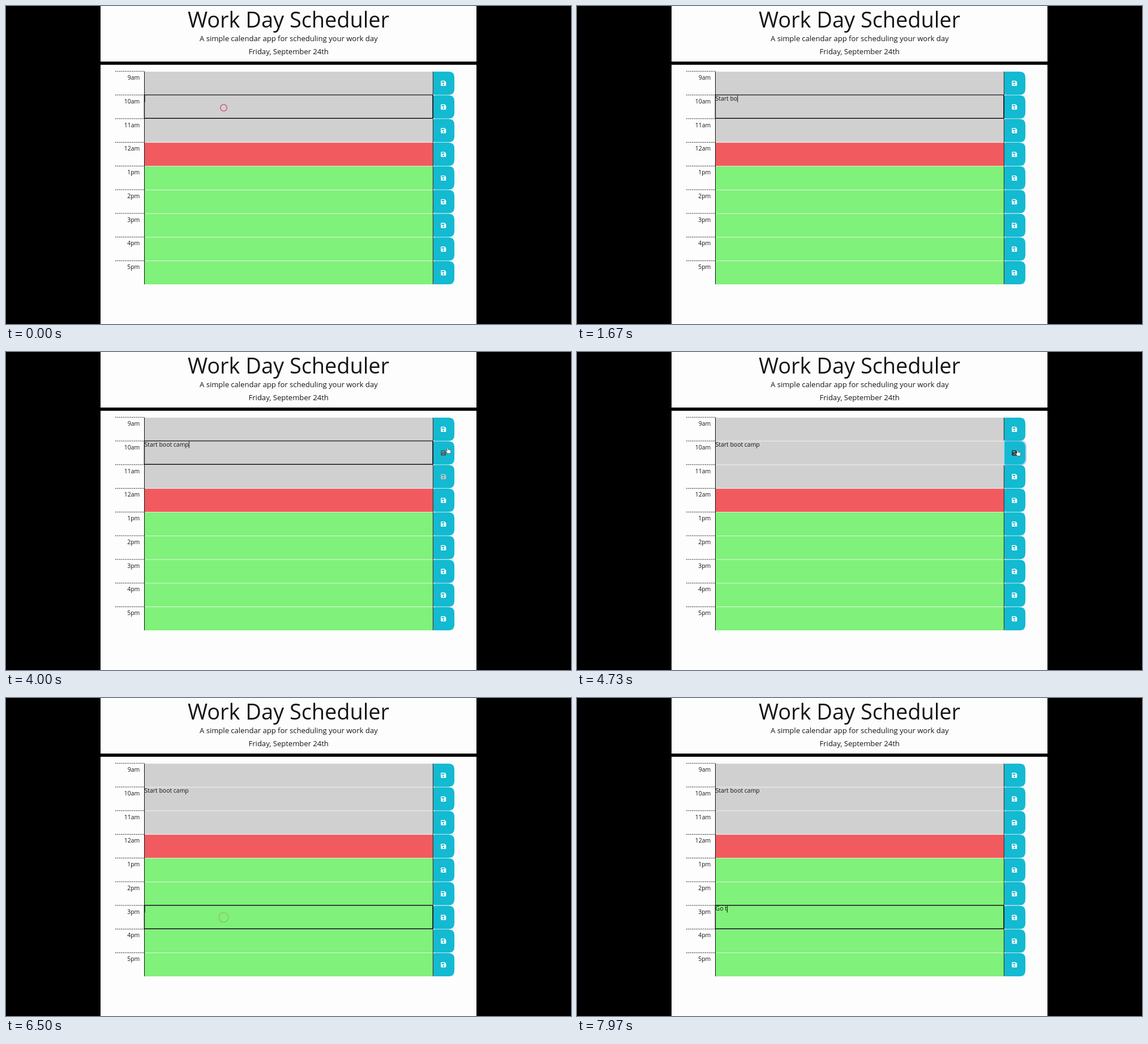
An HTML page that plays this animation: 998 px wide and 561 px high, repeating every 8000 ms.

```html
<!DOCTYPE html>
<html lang="en">
<head>
<meta charset="utf-8">
<title>Work Day Scheduler</title>
<style>
html, body { margin: 0; width: 100%; height: 100%; overflow: hidden; background: #000; }
svg { display: block; width: 998px; height: 561px; }
text { font-family: "Open Sans", sans-serif; fill: #151515; white-space: pre; }
.center { text-anchor: middle; }
.small { font-size: 10.44px; }
</style>
</head>
<body>
<svg id="stage" viewBox="0 0 998 561">
  <rect x="167" width="664" height="561" fill="#fdfdfd"/>
  <rect x="167" y="98" width="664" height="5.7"/>
  <text class="center" x="499" y="38" font-size="37.9">Work Day Scheduler</text>
  <text class="center" x="499.3" y="61.5" font-size="13.06">A simple calendar app for scheduling your work day</text>
  <text class="center" x="499.2" y="85" font-size="13.06">Friday, September 24th</text>
</svg>
<script>
const LOOP = 8000, TOP = 115, PITCH = 41.78, BLINK = 500;
const GRAY = '#d0d0d0', RED = '#f15b5f', GREEN = '#80f17a';
const HOURS = ['9am', '10am', '11am', '12am', '1pm', '2pm', '3pm', '4pm', '5pm'];
const FLOPPY = 'M1.2 0H6.7L9.2 2.5V8Q9.2 9.2 8 9.2H1.2Q0 9.2 0 8V1.2Q0 0 1.2 0Z' +
  'M1.4 1.4V3.7H6.3V1.4ZM4.6 5.1A1.4 1.4 0 1 0 4.6 7.9A1.4 1.4 0 1 0 4.6 5.1Z';
const HAND = 'M2.1 1Q3.1 0 4 1V4.6L8 5.5Q9 5.9 8.9 7L8.2 11.5H3.1L-.3 7.5Q-.4 6 2.1 7.2Z';

const stage = document.getElementById('stage');
const rowY = i => TOP + PITCH * i;

function add(tag, attrs, content) {
  const el = document.createElementNS('http://www.w3.org/2000/svg', tag);
  for (const key in attrs) el.setAttribute(key, attrs[key]);
  if (content) el.textContent = content;
  return stage.appendChild(el);
}
function set(el, attrs) {
  for (const key in attrs) el.setAttribute(key, attrs[key]);
}
const show = (el, on) => set(el, { visibility: on ? 'visible' : 'hidden' });

// Linear interpolation through [time, value] steps.
function track(steps, t) {
  if (t <= steps[0][0]) return steps[0][1];
  for (let i = 1; i < steps.length; i++) {
    const [t0, a] = steps[i - 1], [t1, b] = steps[i];
    if (t < t1) return a + (b - a) * (t - t0) / (t1 - t0);
  }
  return steps[steps.length - 1][1];
}

const buttonShape = y => `M757 ${y}H782Q792 ${y} 792 ${y + 10}V${y + 31}Q792 ${y + 41} 782 ${y + 41}H757Q755 ${y + 41} 755 ${y + 39}V${y + 2}Q755 ${y} 757 ${y}Z`;

HOURS.forEach((hour, i) => {
  const y = rowY(i);
  add('path', { d: `M193 ${y + .2}H244`, stroke: '#222', 'stroke-dasharray': '2 1.3' });
  add('text', { class: 'small', x: 236.3, y: y + 15, 'text-anchor': 'end' }, hour);
  add('rect', { x: 244, y: y + .8, width: 510, height: 41, fill: i < 3 ? GRAY : i < 4 ? RED : GREEN });
});
add('path', { d: `M244.5 ${TOP + .5}V491M754.3 ${TOP + .5}V491`, stroke: '#111' });

const ring = add('path', { d: buttonShape(rowY(1) + .7), fill: 'none', stroke: '#c4cff0', 'stroke-width': 4.4 });
const icons = HOURS.map((_, i) => {
  const y = rowY(i);
  add('path', { d: buttonShape(y + .7), fill: '#13bad1' });
  return add('path', { d: FLOPPY, transform: `translate(768.1 ${y + 16.8})`, 'fill-rule': 'evenodd' });
});

const outline = add('rect', { x: 244.4, width: 509.5, height: 41.4, rx: 1, fill: 'none', stroke: '#0b0b14', 'stroke-width': 1.4 });

// Text fields: when each gains and loses focus, and when each key lands.
const fields = [
  { row: 1, from: 0, to: 4450, words: 'Start boot camp',
    keys: [500, 640, 790, 930, 1060, 1200, 1400, 1600, 1780, 1930, 2080, 2250, 2420, 2560, 2720] },
  { row: 6, from: 6300, to: LOOP, words: 'Go t', keys: [7480, 7620, 7760, 7900] }
];
for (const field of fields)
  field.text = add('text', { class: 'small', x: 244.6, y: rowY(field.row) + 9.8 });
const caret = add('rect', { width: 1, height: 12, fill: '#111' });

const hover = {
  1: [[3870, 0], [4000, .82], [4080, 1], [4900, 1], [5050, 0]],
  2: [[3740, 0], [3870, .8], [4080, 0]]
};
const pointerX = [[3740, 782], [4000, 777], [4200, 775], [4750, 775], [4950, 755]];
const pointerY = [[3740, 235], [4000, 167.5], [4200, 172], [4750, 172], [4950, 180]];
const hand = add('path', { d: HAND, fill: '#fff', stroke: '#444', 'stroke-width': .7 });

const clicks = [[0, 384.5, 179.5], [4450, 777, 173], [6300, 384.5, 387]];
const ripple = add('circle', { r: 5.8, fill: 'none', stroke: '#cf2f50', 'stroke-width': 1.1 });

function draw(t) {
  const active = fields.find(f => t >= f.from && t < f.to);
  for (const f of fields) {
    const typed = f.words.slice(0, f.keys.filter(k => k <= t).length);
    if (f.text.textContent !== typed) f.text.textContent = typed;
  }

  show(outline, active);
  show(caret, false);
  if (active) {
    const y = rowY(active.row);
    const last = Math.max(active.from, ...active.keys.filter(k => k <= t));
    const width = active.text.textContent ? active.text.getComputedTextLength() : 0;
    set(outline, { y: y + .1 });
    set(caret, { x: 244.6 + width, y: y + .8 });
    show(caret, Math.floor((t - last) / BLINK) % 2 === 0);
  }

  show(ring, t >= 4450 && t < 6300);
  icons.forEach((icon, i) => {
    const dark = hover[i] ? track(hover[i], t) : 0;
    const shade = Math.round(255 - 205 * dark);
    set(icon, { fill: `rgb(${shade},${shade},${shade})` });
  });

  show(hand, t >= 3740 && t < 4950);
  set(hand, { transform: `translate(${track(pointerX, t)} ${track(pointerY, t)})` });

  const click = clicks.find(([at]) => t >= at && t < at + 300);
  show(ripple, click);
  if (click) {
    const p = (t - click[0]) / 300;
    set(ripple, { cx: click[1], cy: click[2], r: 5.8 + 4 * p, opacity: 1 - p });
  }
}

const start = performance.now();
function tick() {
  draw((performance.now() - start) % LOOP);
  requestAnimationFrame(tick);
}
tick();
</script>
</body>
</html>
```
